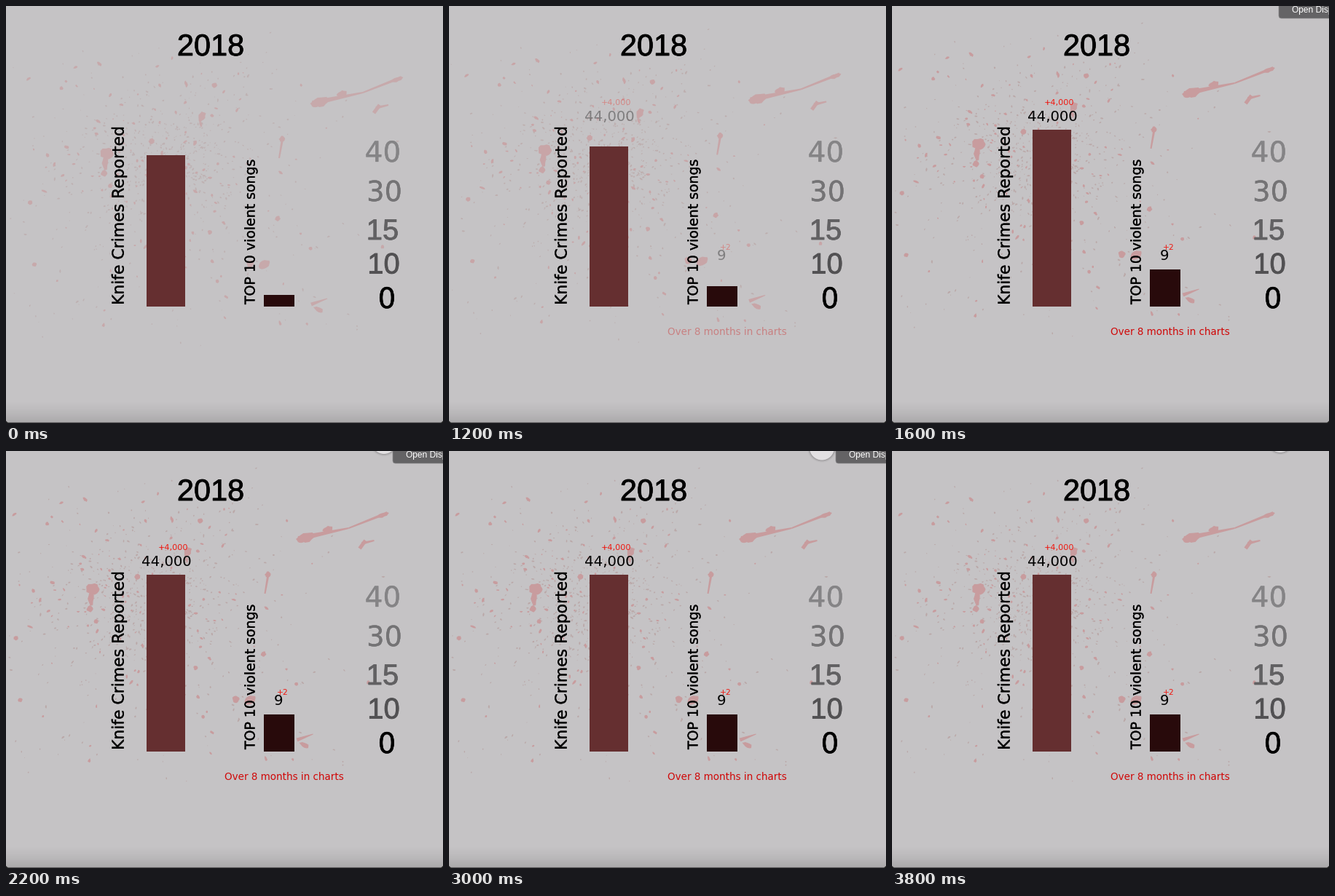
Recreate the animation shown at these times as a matplotlib script. Size 600x573 px, loop 3.9 s.

```python
import numpy as np
import matplotlib.pyplot as plt
from matplotlib.animation import FuncAnimation
from matplotlib.collections import PolyCollection
from matplotlib.patches import Circle, FancyBboxPatch, Rectangle
from matplotlib.patheffects import withStroke

W, H, DPI = 600, 573, 100
FRAMES, STEP = 39, 100
PAPER = np.array([197, 195, 197]) / 255
BLOOD = np.array([205, 100, 102]) / 255
MIST = np.array([165, 112, 110]) / 255
BASE = 413

rng = np.random.default_rng(8)
fig = plt.figure(figsize=(W / DPI, H / DPI), dpi=DPI, facecolor=PAPER)
ax = fig.add_axes([0, 0, 1, 1])
ax.axis("off")


def label(x, y, text, px, color="black", font="DejaVu Sans", ha="center",
          bold=0.0, **kw):
    item = ax.text(x, y, text, fontsize=px * 72 / DPI, family=font, color=color,
                   ha=ha, va="baseline", rotation_mode="anchor", **kw)
    if bold:
        item.set_path_effects([withStroke(linewidth=bold, foreground=color)])
    return item


def blob(x, y, w, h, tilt=0, rough=0.18, points=14):
    """Ragged ellipse, tilt in degrees."""
    a = np.linspace(0, 2 * np.pi, points, endpoint=False)
    r = 1 + rng.uniform(-rough, rough, points)
    u, v = w / 2 * r * np.cos(a), h / 2 * r * np.sin(a)
    c, s = np.cos(np.radians(tilt)), np.sin(np.radians(tilt))
    return np.column_stack([x + u * c - v * s, y + u * s + v * c])


def streak(x0, y0, x1, y1, w0, w1):
    """Tapered stroke between two points."""
    d = np.array([x1 - x0, y1 - y0], float)
    n = np.array([-d[1], d[0]]) / np.hypot(*d) / 2
    a, b = np.array([x0, y0]), np.array([x1, y1])
    return np.array([a + n * w0, b + n * w1, b - n * w1, a - n * w0])


def speck(x, y, size):
    tilt = np.degrees(np.arctan2(y - 215, x - 215)) + rng.normal(0, 35)
    return blob(x, y, size * rng.uniform(1, 2.2), size, tilt, 0.3, 8)


def make_drops():
    drops = [
        blob(432, 132, 25, 12, -10), blob(424, 134, 11, 10),
        blob(461, 121, 14, 9, -15), blob(537, 101, 15, 6, -18),
        streak(442, 129, 490, 119, 6, 2), streak(490, 119, 543, 98, 2, 4),
        streak(505, 147, 513, 136, 5, 5), streak(508, 140, 525, 136, 4, 2),
        blob(139, 203, 18, 16), blob(136, 216, 8, 20),
        blob(269, 152, 9, 15, 25), blob(355, 355, 16, 11, -20),
        streak(379, 186, 375, 209, 3, 2), streak(419, 410, 441, 402, 5, 1),
        blob(429, 417, 14, 6, 25),
    ]
    spots = [(286, 109, 7), (379, 183, 8), (373, 292, 7), (335, 354, 9),
             (39, 355, 6), (418, 333, 5), (200, 186, 8), (76, 113, 5),
             (33, 270, 6), (57, 205, 5), (290, 378, 5), (280, 311, 6),
             (517, 331, 5), (135, 230, 9), (143, 247, 6)]
    drops += [blob(x, y, d, d) for x, y, d in spots]
    for _ in range(140):
        x, y = rng.normal((215, 220), (95, 85))
        if 15 < x < 480 and 65 < y < 440:
            drops.append(speck(x, y, rng.uniform(1.5, 4)))
    return drops


def make_mist():
    mist = [speck(*rng.normal((225, 215), (50, 45)), rng.uniform(0.7, 2.2))
            for _ in range(430)]
    mist += [speck(*rng.normal((215, 235), (115, 90)), rng.uniform(0.7, 2.2))
             for _ in range(260)]
    mist += [speck(rng.uniform(5, 500), rng.uniform(45, 462), rng.uniform(0.8, 2))
             for _ in range(70)]
    return mist


layers = []
for shapes, tint, low, high in ((make_mist(), MIST, 0.22, 0.33),
                                (make_drops(), BLOOD, 0.27, 0.41)):
    group = PolyCollection(shapes, linewidths=0, zorder=1)
    ax.add_collection(group)
    layers.append((group, shapes, tint, low, high))

# soft shade and dark edge along the bottom
shade = np.zeros((32, 1, 4))
shade[:, 0, 3] = 0.13 * np.linspace(0, 1, 32) ** 1.5
ax.imshow(shade, extent=(0, W, 572, 540), aspect="auto", zorder=1.5)
ax.add_patch(Rectangle((0, 572), W, 1, color="#5a595a", lw=0))
for x, d in ((0, 3), (W, -3)):
    ax.fill([x, x, x + d], [H, H - 3, H], color="#222222", lw=0)

crime_bar = ax.add_patch(Rectangle((193.3, 205), 52.2, 208, color="#652f30", lw=0))
song_bar = ax.add_patch(Rectangle((353.6, 397), 42.2, 16, color="#280a0b", lw=0))

label(281, 68, "2018", 41.5, font="Liberation Sans", bold=0.6)
label(161.5, 411, "Knife Crimes Reported", 21.9, ha="left", rotation=90, bold=0.2)
label(341.5, 410, "TOP 10 violent songs", 18.9, ha="left", rotation=90, bold=0.2)
label(517.5, 214, "40", 39, "#858486", bold=0.2)
label(519.5, 268, "30", 38.5, "#747375", bold=0.2)
label(517, 321, "15", 40, "#626163", "Liberation Sans", bold=0.6)
label(518.5, 367.5, "10", 40, "#525153", "Liberation Sans", bold=0.6)
label(523, 415, "0", 39, bold=0.3)

results = [
    label(220.5, 158, "44,000", 19.8),
    label(374, 349, "9", 19.8),
    label(229.5, 136, "+4,000", 11.2, "#f01810"),
    label(380, 335, "+2", 10.8, "#f01810"),
    label(382, 452.5, "Over 8 months in charts", 13.5, "#d00808"),
]

tip = [
    ax.add_patch(FancyBboxPatch((535, -20), 90, 33, boxstyle="round,pad=4",
                                fc="#646365", ec="#8d8c8e", lw=0.5, zorder=5)),
    label(549, 9.5, "Open Displ", 12, "white", "Liberation Sans", ha="left",
          zorder=6, clip_on=True),
]
knob = [ax.add_patch(Circle((0, 0), r, fc=c, alpha=a, lw=0, zorder=4))
        for r, c, a in ((20, "#555555", 0.08), (18.8, "#555555", 0.12),
                        (17.8, "#555555", 0.22), (17, "#e2e0e2", 1))]

ax.set_xlim(0, W)
ax.set_ylim(H, 0)


def update(i):
    t = i * STEP
    p = float(np.clip((t - 983) / 617, 0, 1))

    shift = np.array([-19.5, -13]) * p
    for group, shapes, tint, low, high in layers:
        group.set_verts([s + shift for s in shapes])
        group.set_facecolor(PAPER + (tint - PAPER) * (low + (high - low) * p))

    for bar, top in ((crime_bar, 205), (song_bar, 397)):
        top -= 35.5 * p
        bar.set_y(top)
        bar.set_height(BASE - top)
    for item in results:
        item.set_alpha(p)

    for item in tip:
        item.set_visible(1500 <= t < 3200)
    times = [2200, 2600, 3300, 3800]
    x = np.interp(t, times, [519, 512, 512, 533])
    y = np.interp(t, times, [-13, -4.5, -4.5, -15])
    for disc in knob:
        disc.center = (x, y)
        disc.set_visible(t >= 2200)
    return []


anim = FuncAnimation(fig, update, frames=FRAMES, interval=STEP, repeat=True,
                     repeat_delay=0, blit=False)
plt.show()
```
